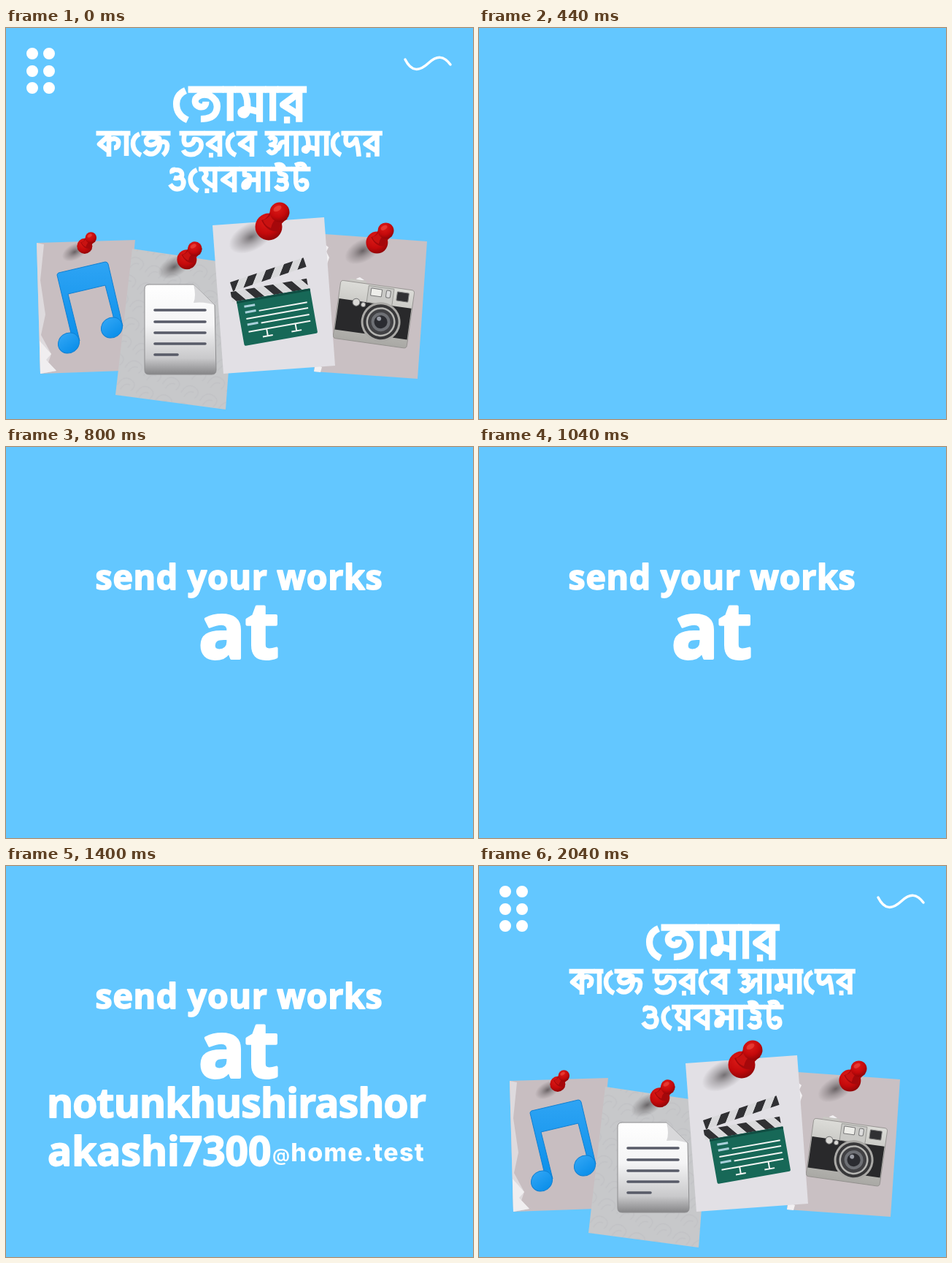
Recreate the animation shown at these times as an HTML page. Size 640x535 px, loop 2.2 s.

```html
<!DOCTYPE html>
<html lang="bn">
<head>
<meta charset="utf-8">
<style>
  html, body { margin: 0; width: 100%; height: 100%; overflow: hidden; background: #63c7ff; }
  svg { display: block; width: 100vw; height: 100vh; }
  .type { font: 700 55px "Open Sans", "Noto Sans", sans-serif; fill: #fff; stroke: #fff; stroke-width: 1.8; stroke-linejoin: round; }
  .mail { font: 800 34px Inter, Roboto, sans-serif; letter-spacing: 1.3px; stroke: none; }
</style>
</head>
<body>
<svg viewBox="0 0 640 535">
  <defs>
    <linearGradient id="sheet" x2="0" y2="1">
      <stop stop-color="#fff"/><stop offset=".45" stop-color="#f4f4f5"/>
      <stop offset=".82" stop-color="#c9c9cb"/><stop offset="1" stop-color="#858587"/>
    </linearGradient>
    <linearGradient id="blue" x2="0" y2="1">
      <stop stop-color="#2ea4f4"/><stop offset="1" stop-color="#0b8fea"/>
    </linearGradient>
    <linearGradient id="silver" x2="0" y2="1">
      <stop stop-color="#dcdcd8"/><stop offset="1" stop-color="#a9a8a4"/>
    </linearGradient>
    <radialGradient id="red" cx=".4" cy=".3" r=".75">
      <stop stop-color="#de1c18"/><stop offset=".6" stop-color="#c4090b"/><stop offset="1" stop-color="#8a0507"/>
    </radialGradient>
    <radialGradient id="shade">
      <stop stop-color="#2a2426" stop-opacity=".6"/><stop offset=".5" stop-color="#3a3436" stop-opacity=".28"/>
      <stop offset="1" stop-color="#3a3436" stop-opacity="0"/>
    </radialGradient>
    <pattern id="stripes" width="26" height="40" patternUnits="userSpaceOnUse" patternTransform="skewX(-40)">
      <path d="M0 0H26V40H0z" fill="#303033"/><path d="M13 0H26V40H13z" fill="#d9d9db"/>
    </pattern>
    <pattern id="stripesBack" href="#stripes" patternTransform="skewX(40)"/>
    <pattern id="swirl" width="28" height="26" patternUnits="userSpaceOnUse" patternTransform="rotate(24)">
      <path d="M2 20Q4 4 16 6T22 20M8 24Q10 12 18 13" fill="none" stroke="#b9babd" stroke-width="1.5" opacity=".4"/>
    </pattern>
    <g id="pin">
      <ellipse cx="-5" cy="48" rx="33" ry="19" transform="rotate(-28 -5 48)" fill="url(#shade)"/>
      <circle cx="19" cy="34" r="18.5" fill="url(#red)"/>
      <path d="M9 25Q19 23 22 10L45 23Q34 29 32 40Q17 42 9 25z" fill="#a5080b"/>
      <path d="M11 25Q20 22 24 13L34 20Q24 25 22 36Q14 33 11 25z" fill="#c91211"/>
      <circle cx="34" cy="14" r="13.5" fill="url(#red)"/>
      <ellipse cx="31" cy="9" rx="6" ry="3.5" transform="rotate(-30 31 9)" fill="#f4574b" opacity=".5"/>
    </g>
  </defs>

  <g id="poster">
    <path d="M36 35h0m23 0h0M36 59h0m23 0h0M36 82h0m23 0h0" stroke="#fff" stroke-width="16" stroke-linecap="round"/>
    <path d="M547 43C556 61 567 59 579 48S600 38 609 50" fill="none" stroke="#fff" stroke-width="3.5" stroke-linecap="round"/>
    <g id="title" fill="none" stroke="#fff" stroke-width="6.6" stroke-linejoin="round" role="img" aria-label="তোমার কাজে ভরবে আমাদের ওয়েবসাইট"></g>

    <!-- music note -->
    <path d="M42 294L177 290L160 469L47 473z" fill="#c8bec1"/>
    <path d="M42 294L52 296L47 345L54 392L48 420L62 446L58 458L69 469L47 473z" fill="#dedadd"/>
    <path d="M46 428L62 446L55 454L69 469L47 473z" fill="#f0eef0"/>
    <g fill="url(#blue)" stroke="#1180d2">
      <path d="M72 335L136 320Q139 320 140 323L160 408L151 410L136 352L85 364L101 428L92 430L70 338Q70 336 72 335z"/>
      <ellipse cx="86" cy="431" rx="15" ry="13.5" transform="rotate(-35 86 431)"/>
      <ellipse cx="145" cy="410" rx="15" ry="13.5" transform="rotate(-35 145 410)"/>
    </g>

    <!-- camera -->
    <path d="M437 282L577 292L564 480L422 470z" fill="#c9c0c3"/>
    <path d="M437 296l5 4-3 6 4 8-4 12zM424 460l9 4-2 7-9-1zM480 343l5-2 6 4-9 1z" fill="#f2f0f2"/>
    <g transform="translate(459 345) rotate(8)">
      <rect x="12" y="-4" width="23" height="7" rx="2" fill="#c8c7c3"/>
      <rect width="102" height="80" rx="4" fill="url(#silver)" stroke="#8e8c8a" stroke-width=".8"/>
      <path d="M1 25H101V68H1z" fill="#29292b"/>
      <path d="M39 2H74V25H39z" fill="#c9c9c6" stroke="#8f8f8c" stroke-width=".8"/>
      <rect x="43" y="5" width="15" height="10" rx="1" fill="#eeeeea" stroke="#777"/>
      <rect x="64" y="5" width="6" height="10" rx="2" fill="#ddd" stroke="#777"/>
      <rect x="79" y="5" width="16" height="12" rx="1" fill="#303033" stroke="#777"/>
      <g stroke="#777"><circle cx="25" cy="27" r="5" fill="#dad9d6"/><circle cx="35" cy="29" r="3" fill="#dad9d6"/></g>
      <g transform="translate(62 49)">
        <circle r="27" fill="#aaa9a6"/><circle r="24" fill="#373739"/>
        <circle r="20" fill="#b5b5b2"/><circle r="17.5" fill="#414144"/>
        <circle r="13" fill="#6e7075"/><circle r="9" fill="#2b2c31"/>
        <circle cx="-3" cy="-4" r="3" fill="#999ca5"/>
      </g>
    </g>

    <!-- document -->
    <path d="M173 302L316 323L301 522L150 502z" fill="#c7c8ca"/>
    <path d="M173 302L316 323L301 522L150 502z" fill="url(#swirl)"/>
    <path d="M196 351H257L286 379L288 468Q288 474 282 474H196Q190 474 190 468V357Q190 351 196 351z" fill="url(#sheet)" stroke="#8c8c8e"/>
    <path d="M257 351Q261 367 257 376Q272 374 286 379z" fill="#d8d8da"/>
    <path d="M204 386H273M204 402H273M204 417H273M204 432H273M204 447H235" stroke="#585b68" stroke-width="3.6" stroke-linecap="round"/>

    <!-- clapper board -->
    <path d="M283 270L436 259L451 462L298 473z" fill="#e2e0e5"/>
    <rect width="106" height="13" transform="translate(307 348) rotate(-18.5)" fill="url(#stripes)"/>
    <g transform="translate(316 374) rotate(-10)">
      <rect x="-6" y="-14" width="106" height="14" fill="url(#stripesBack)"/>
      <rect width="102" height="62" rx="2" fill="#176857"/>
      <path d="M0 0H102V3H0z" fill="#0f4d42"/>
      <g fill="none" stroke="#f2f5f3" stroke-width="2">
        <path d="M9 9H24M9 17H24M9 34H24" stroke="#a9d0da" stroke-width="3"/>
        <path d="M28 18H95M9 26H95M28 35H95M9 44H95M34 44V54M74 44V54M27 54H41M67 54H81"/>
      </g>
    </g>

    <use href="#pin" transform="translate(97 279) scale(.57)"/>
    <use href="#pin" transform="translate(234 292) scale(.73)"/>
    <use href="#pin" transform="translate(341 238)"/>
    <use href="#pin" transform="translate(493 266) scale(.81)"/>
  </g>

  <g class="type">
    <text data-from="600" x="319.5" y="195" text-anchor="middle" style="font-size:46.5px;letter-spacing:.7px">send your works</text>
    <text data-from="800" x="319" y="288.5" text-anchor="middle" style="font-size:106px;stroke-width:4px">at</text>
    <g data-from="1200">
      <text x="56" y="343.5" style="letter-spacing:-.8px">notunkhushirashor</text>
      <text x="57" y="409.5">akashi7300</text>
    </g>
    <text data-from="1400" class="mail" x="365" y="404"><tspan style="font-size:24px;font-weight:600">@</tspan>home.test</text>
  </g>
</svg>
<script>
  // Each letter: advance width and pen strokes below the headline.
  const ba = "M21 3V35M20 7L5 18L21 28";
  const letters = {
    "া": [12, "M7 3V34"],
    "ে": [16, "M13 4Q4 8 4 17Q4 28 15 33"],
    "ব": [28, ba],
    "র": [28, ba + "M6 33H12"],
    "ক": [34, "M17 3V35M16 7L4 18L17 28M17 13C24 8 32 11 30 18Q29 23 24 23"],
    "জ": [39, "M20 3V9Q8 6 6 13Q6 20 14 19Q22 17 24 10Q27 24 18 30Q10 34 4 27M25 16Q34 12 35 20Q35 28 29 33"],
    "ত": [34, "M17 15Q17 21 11 20Q5 18 7 12Q12 6 21 9Q31 15 27 25Q24 32 12 32"],
    "ম": [30, "M24 3V35M7 3Q12 8 12 18V24Q10 30 6 27Q4 23 12 22L24 25"],
    "ভ": [34, "M7 3Q3 20 12 19Q19 18 20 11Q32 11 29 23Q25 33 13 32Q7 31 5 26"],
    "অ": [36, "M30 3V35M5 11Q10 7 14 11Q16 17 8 19Q17 19 15 27Q9 34 4 26M15 25Q20 25 21 18Q23 14 30 15"],
    "দ": [28, "M7 3Q3 20 11 20Q17 18 20 11Q23 22 24 35"],
    "ও": [28, "M7 9Q5 3 11 4Q22 4 20 13Q15 17 9 15M18 14Q26 20 20 29Q10 34 4 24"],
    "য়": [28, "M22 3V35M7 4Q13 10 7 15Q5 19 22 28M8 33H14"],
    "স": [32, "M26 3V35M7 3V11Q17 11 13 18Q4 22 6 28Q13 31 14 18H26"],
    "ই": [28, "M5 -2Q16 -6 18 3M14 3Q8 9 15 10Q22 11 20 17Q16 20 8 18M16 18Q24 22 20 29Q12 34 6 26"],
    "ট": [26, "M5 -2Q18 -8 19 3M6 3V18Q6 32 16 31Q24 28 20 20Q14 16 12 22"]
  };

  // Letters are listed in visual order, left to right.
  function word(x, y, scale, text) {
    let pen = 0;
    const strokes = text.split(" ").map(ch => {
      const [width, path] = letters[ch];
      const bar = "েও".includes(ch) ? "" : `M-.5 3H${width + .5}`;
      const mark = `<path transform="translate(${pen})" d="${path}${bar}"/>`;
      pen += width;
      return mark;
    });
    return `<g transform="translate(${x} ${y}) scale(${scale})">${strokes.join("")}</g>`;
  }

  document.getElementById("title").innerHTML =
    word(228, 80, 1.39, "ে ত া ম া র") +
    word(124, 141, 1, "ক া ে জ") +
    word(238, 141, 1, "ভ র ে ব") +
    word(355, 141, .99, "অ া ম া ে দ র") +
    word(221, 190, .99, "ও ে য় ব স া ই ট");

  const LOOP = 2200, CLEAR = 200, RETURN = 1800;
  const poster = document.getElementById("poster");
  const lines = document.querySelectorAll("[data-from]");
  const show = (el, on) => el.setAttribute("visibility", on ? "visible" : "hidden");
  const start = performance.now();

  function draw() {
    const t = (performance.now() - start) % LOOP;
    show(poster, t < CLEAR || t >= RETURN);
    lines.forEach(el => show(el, t >= +el.dataset.from && t < RETURN));
    requestAnimationFrame(draw);
  }
  draw();
</script>
</body>
</html>
```
